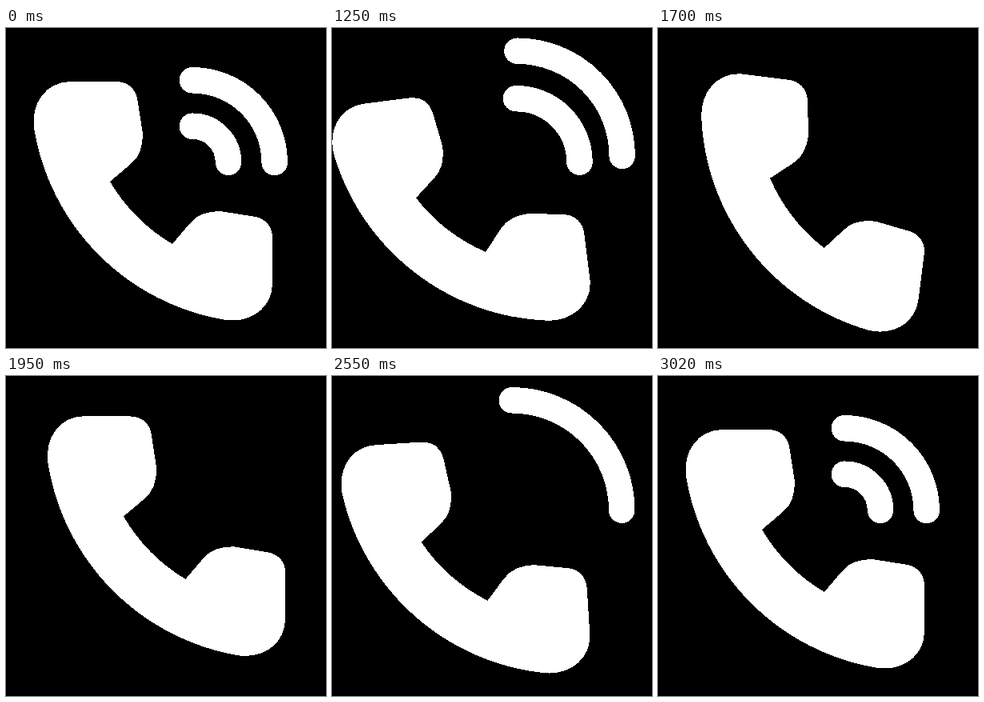
Write an HTML page that moves like this. It is 400 px wide and 400 px high and loops after 3050 ms.

```html
<!DOCTYPE html>
<html lang="en">
<head>
<meta charset="utf-8">
<title>Ringing phone</title>
<style>
  html, body { margin: 0; width: 100%; height: 100%; overflow: hidden; background: #000; }
  svg { display: block; width: 100%; height: 100%; shape-rendering: crispEdges; }
  .wave { fill: none; stroke: #fff; stroke-width: 32.5; stroke-linecap: round; }
</style>
</head>
<body>
<svg viewBox="0 0 400 400">
  <path id="phone" fill="#fff" d="M147 175Q176 224 225 253L247 227C256 216 269 212 285 212L329 219
    C342 221.5 350 232 350 245L350 302C350 333 323 352 292 348A290 290 0 0 1 52 108
    C48 77 67 50 98 50L155 50C168 50 178.5 58 181 71L188 115C188 131 184 144 173 153Z"/>
  <path id="inner" class="wave"/>
  <path id="outer" class="wave"/>
</svg>
<script>
const LOOP = 3050, TURN = 2010, WAVE_START = 1020, WAVE_TIME = 480;
const [phone, inner, outer] = ["phone", "inner", "outer"].map(id => document.getElementById(id));

const linear = u => u;
const smooth = u => u * u * (3 - 2 * u);

// Steps are [time, value, easing towards this value]
const tilt = [
  [1000, 0], [1043, -10, linear], [1137, 10, linear], [1237, -10, linear],
  [1337, 10, linear], [1437, -10, linear], [1537, 10, linear], [2005, 0, smooth]
];
const slide = [[1000, -17], [1310, -36.5, smooth], [2000, 0, smooth]];

function valueAt(steps, t) {
  if (t <= steps[0][0]) return steps[0][1];
  for (let i = 1; i < steps.length; i++) {
    const [t0, v0] = steps[i - 1], [t1, v1, ease] = steps[i];
    if (t < t1) return v0 + (v1 - v0) * ease((t - t0) / (t1 - t0));
  }
  return steps[steps.length - 1][1];
}

function drawWave(el, cx, cy, r, visible) {
  el.setAttribute("d", `M${cx} ${cy - r}A${r} ${r} 0 0 1 ${cx + r} ${cy}`);
  el.setAttribute("visibility", visible ? "visible" : "hidden");
}

function draw(time) {
  // The second half retraces the first
  const t = time < TURN ? time : 2 * TURN - time;
  const d = valueAt(slide, t);
  phone.setAttribute("transform", `translate(${d} ${-d}) rotate(${valueAt(tilt, t)} 165 235)`);

  const p = Math.max(0, (t - WAVE_START) / WAVE_TIME) ** 1.48;
  drawWave(inner, 233 - 9 * p, 167.7, 45 + 102 * p, t < 1511);
  drawWave(outer, 233 - 4.4 * p, 168 - 24 * p, 102.7 + 84 * p, t < 1360);
}

const origin = performance.now();
function tick() {
  draw((performance.now() - origin) % LOOP);
  requestAnimationFrame(tick);
}
tick();
</script>
</body>
</html>
```
